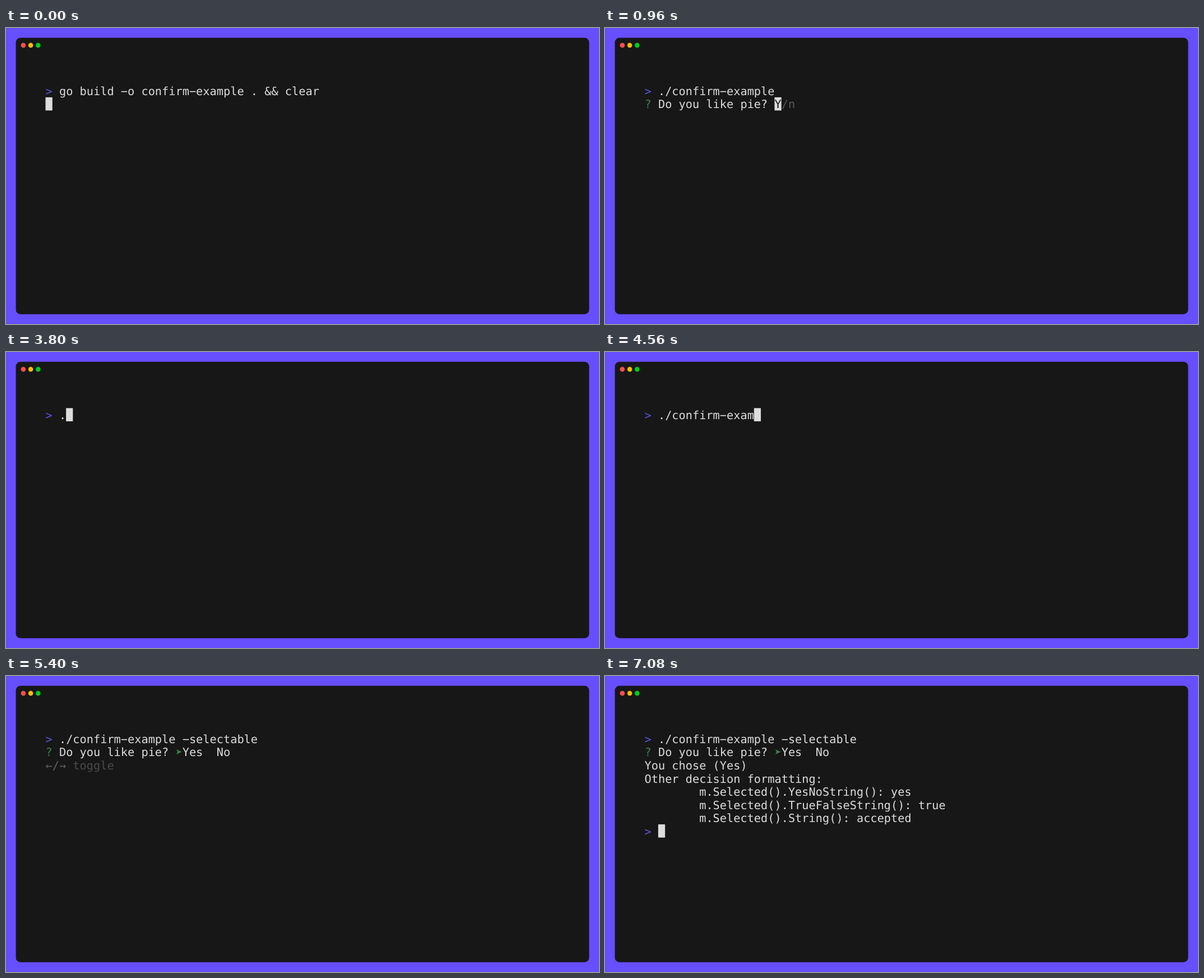
Write an HTML page with a canvas that moves like this. It is 1058 px wide and 529 px high and loops after 8 s.

```html
<!DOCTYPE html>
<html lang="en">
<head>
<meta charset="utf-8">
<title>Terminal confirm prompt</title>
<style>
  html, body { margin: 0; width: 100%; height: 100%; overflow: hidden; background: #674eff; }
  canvas { display: block; }
</style>
</head>
<body>
<canvas id="stage" width="1058" height="529"></canvas>
<script>
const ctx = document.getElementById('stage').getContext('2d');
const LOOP = 8000, STEP = 40;
const LEFT = 70.5, TOP = 100.3, CELL = 12.21, LINE = 23.55, BASELINE = 19.6;
const BG = '#171717', FG = '#dddddd', VIOLET = '#5a56e0', GREEN = '#3f7f50';
const DIM = '#585858', HINT_KEY = '#626262', HINT = '#4a4a4a';
const COMMAND = './confirm-example', SELECTABLE = COMMAND + ' -selectable';

function text(row, col, string, color = FG) {
  ctx.fillStyle = color;
  // The terminal face has a long hyphen, so the minus glyph stands in for it.
  [...string.replace(/-/g, '\u2212')].forEach((char, i) => {
    if (char !== ' ') ctx.fillText(char, LEFT + (col + i) * CELL, TOP + row * LINE + BASELINE);
  });
}

function cursor(row, col) {
  ctx.fillStyle = FG;
  ctx.fillRect(LEFT + col * CELL, TOP + row * LINE, CELL, LINE);
}

function command(string, row = 0) {
  text(row, 0, '>', VIOLET);
  text(row, 2, string);
}

function typing(string, count) {
  command(string.slice(0, count));
  cursor(0, 2 + Math.min(count, string.length));
}

function question() {
  text(1, 0, '?', GREEN);
  text(1, 2, 'Do you like pie?');
}

function results(choice, yesNo, trueFalse, plain) {
  text(2, 0, `You chose (${choice})`);
  text(3, 0, 'Other decision formatting:');
  text(4, 8, 'm.Selected().YesNoString(): ' + yesNo);
  text(5, 8, 'm.Selected().TrueFalseString(): ' + trueFalse);
  text(6, 8, 'm.Selected().String(): ' + plain);
  command('', 7);
  cursor(7, 2);
}

function drawWindow() {
  ctx.fillStyle = '#674eff';
  ctx.fillRect(0, 0, 1058, 529);
  ctx.fillStyle = BG;
  ctx.beginPath();
  ctx.roundRect(17.6, 17.6, 1022.8, 493.8, 8);
  ctx.fill();
  ['#ff4f4d', '#febb00', '#00cc1d'].forEach((color, i) => {
    ctx.fillStyle = color;
    ctx.beginPath();
    ctx.arc(30.9 + i * 13.2, 30.9, 4.3, 0, Math.PI * 2);
    ctx.fill();
  });
}

function plainPrompt(t) {
  command(COMMAND);
  question();
  if (t < 2080) {
    cursor(1, 19);
    text(1, 19, 'Y', BG);
    text(1, 20, '/n', DIM);
  } else {
    text(1, 19, 'n');
    if (t >= 2120) results('n', 'no', 'false', 'denied');
  }
}

function selectablePrompt(t) {
  command(SELECTABLE);
  question();
  text(1, 20, 'Yes  No');
  text(1, t >= 6240 && t < 6640 ? 24 : 19, '➤', GREEN);
  if (t < 7080) {
    text(2, 0, '←', HINT_KEY);
    text(2, 1, '/', HINT_KEY);
    text(2, 2, '→', HINT_KEY);
    text(2, 4, 'toggle', HINT);
  } else {
    results('Yes', 'yes', 'true', 'accepted');
  }
}

// Number of characters shown when one arrives every `pace` ms.
const typed = (t, start, pace, first = 1) => first + Math.floor((t - start) / pace);

function draw(t) {
  drawWindow();
  if (t < 40) {
    command('go build -o confirm-example . && clear');
    cursor(1, 0);
  } else if (t < 960) {
    typing(COMMAND, t < 880 ? Math.min(16, typed(t, 40, 50)) : 17);
  } else if (t < 3800) {
    plainPrompt(t);
  } else if (t < 5360) {
    typing(SELECTABLE, t < 4640 ? typed(t, 3800, 55.7) : typed(t, 4640, 50, 16));
  } else if (t < 5400) {
    command(SELECTABLE);
    cursor(1, 0);
  } else {
    selectablePrompt(t);
  }
}

ctx.font = '20.28px "DejaVu Sans Mono", monospace';
ctx.textRendering = 'geometricPrecision';
const began = performance.now();

function tick() {
  const t = (performance.now() - began) % LOOP;
  draw(Math.floor(t / STEP) * STEP);
  requestAnimationFrame(tick);
}
tick();
</script>
</body>
</html>
```
